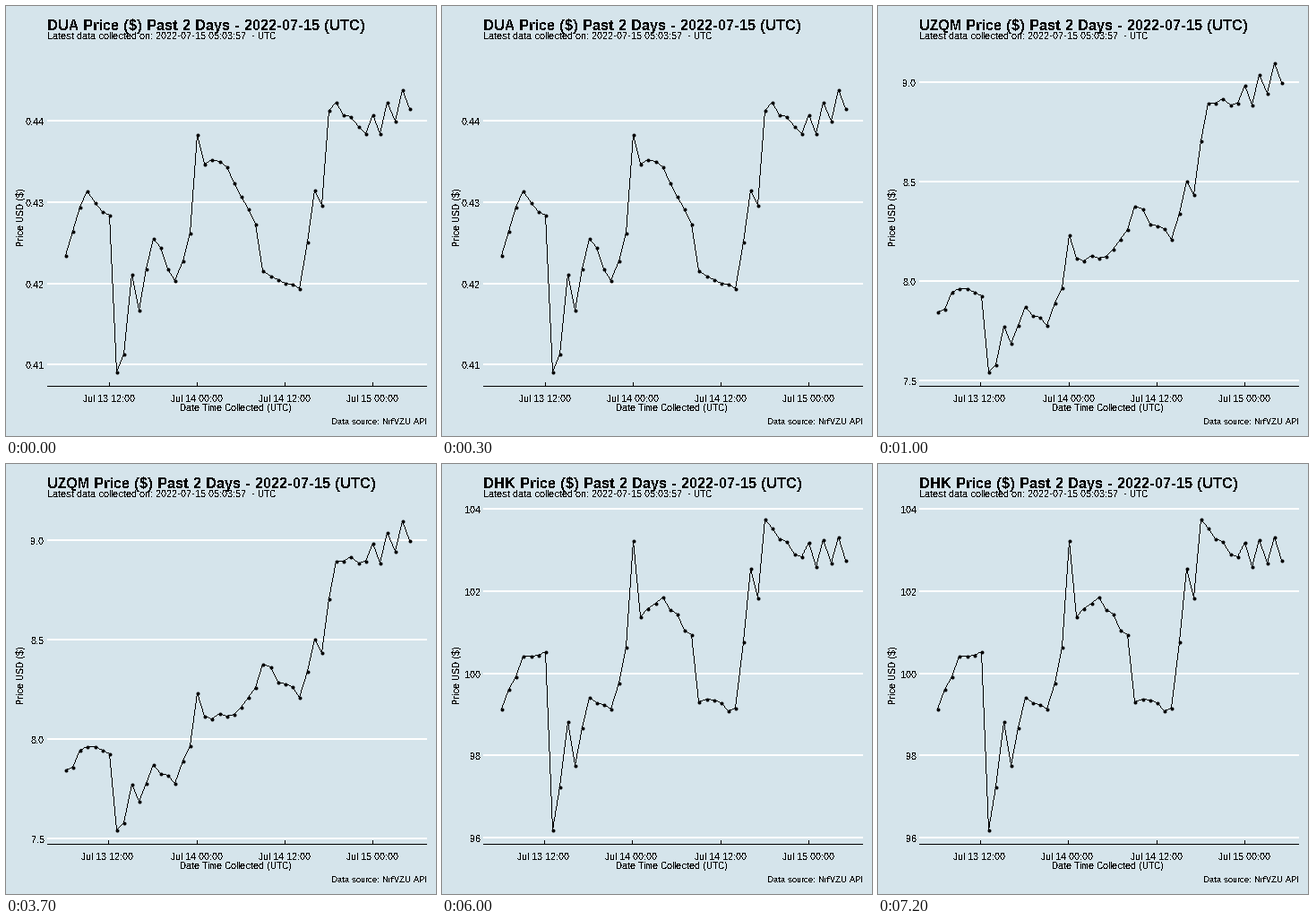
A matplotlib script for the animation above (8000 ms loop, 480x480 px).

```python
import matplotlib.pyplot as plt
import numpy as np
from matplotlib.animation import FuncAnimation

SIZE, DPI = 480, 72
STEP_MS, STEPS = 500, 16
LEFT, RIGHT, BASE = 46, 470, 424.5

plt.rcParams.update({
    "font.family": "Liberation Sans",
    "text.hinting": "native",
    "text.hinting_factor": 1,
    "text.kerning_factor": 6,
    "text.antialiased": False,
})

COINS = ["DUA", "UZQM", "DHK"]

# Turning points of the market: hour, then the height in each chart
TURNS = np.array([
    (0, 278, 341, 273), (3, 206, 315, 214), (6, 233, 323, 209),
    (7, 408, 408, 408), (8, 388, 400, 360), (9, 299, 357, 287),
    (10, 339, 376, 336), (12, 259, 335, 260), (15, 306, 356, 273),
    (17, 253, 314, 204), (18, 143, 255, 85), (19, 176, 281, 170),
    (22, 179, 281, 148), (26, 243, 249, 190), (27, 295, 223, 265),
    (32, 315, 260, 272), (34, 205, 195, 116), (35, 222, 210, 149),
    (36, 116, 150, 61), (37, 107, 108, 71), (41, 142, 108, 103),
    (47, 100, 71, 93),
]).T

# Top grid line, grid spacing, top price, price step, lines, number format
SCALES = [
    (128, 90.75, 0.44, 0.01, 4, ".2f"),
    (85, 111, 9, 0.5, 4, ".1f"),
    (50, 91.75, 104, 2, 5, ".0f"),
]


def heights(k):
    hour = np.arange(48)
    y = np.interp(hour, TURNS[0], TURNS[k + 1])
    noise = np.random.default_rng(k).uniform(-6, 6, 48)
    y += np.where(np.isin(hour, TURNS[0]), 0, noise * (hour < 42))
    # The last hours swing down and up by turns
    y += np.where(hour >= 42, np.where(hour % 2, 14, -14), 0)
    return np.round(y)


PRICES = [heights(k) for k in range(3)]

fig = plt.figure(figsize=(SIZE / DPI, SIZE / DPI), dpi=DPI, facecolor="#d5e4eb")
ax = fig.add_axes([0, 0, 1, 1])


def text(x, y, s, px=11, ha="left", **kw):
    ax.text(x, y, s, fontsize=px, ha=ha, va="baseline", **kw)


def line(x, y, color="black", width=1):
    ax.plot(x, y, color=color, lw=width, solid_capstyle="butt", snap=False)


def stroke(x, y):
    """Hard-edged polyline, one whole pixel at a time."""
    px, py = [], []
    for x0, y0, x1, y1 in zip(x, y, x[1:], y[1:]):
        n = int(max(abs(x1 - x0), abs(y1 - y0))) + 1
        px.append(np.round(np.linspace(x0, x1, n)))
        py.append(np.round(np.linspace(y0, y1, n)))
    px, py = np.concatenate(px), np.concatenate(py)
    ax.hlines(py + 0.5, px, px + 1, colors="black", lw=1, snap=False)


def draw_chart(k):
    top, gap, price, step, count, form = SCALES[k]
    for i in range(count):
        y = round(top + gap * i)
        line([LEFT, RIGHT], [y, y], "white", 2)
        text(43, y + 5, format(price - step * i, form), ha="right")

    x, y = np.round(66 + 49 / 6 * np.arange(48)), PRICES[k]
    stroke(x, y)
    ax.scatter(x + 0.5, y + 0.5, s=16, c="black", lw=0, snap=False, zorder=3)

    line([LEFT, RIGHT], [BASE, BASE])
    for i in range(4):
        tick = int(115.04 - 0.1 * k + 98.1 * i)
        line([tick + 0.5] * 2, [BASE - 4.5, BASE])
        day, hour = divmod(12 * (i + 1), 24)
        text(tick - 0.5, 442, f"Jul {13 + day} {hour:02}:00", ha="center")


def update(n):
    ax.clear()
    ax.set(xlim=(0, SIZE), ylim=(SIZE, 0))
    ax.axis("off")
    # The heading switches one step ahead of the chart
    coin = (n >= 1) + (n >= 11)
    chart = (n >= 2) + (n >= 12)
    draw_chart(chart)
    text(46, 27, f"{COINS[coin]} Price (\\$) Past 2 Days - 2022-07-15 (UTC)",
         17, weight="bold")
    text(46, 37, "Latest data collected on: 2022-07-15 05:03:57  - UTC")
    text(257, 452, "Date Time Collected (UTC)", ha="center")
    text(20, 236, "Price USD (\\$)", ha="center", rotation=90,
         rotation_mode="anchor")
    text(470, 467, "Data source: NifVZU API", 9, ha="right")
    return []


anim = FuncAnimation(fig, update, frames=STEPS, interval=STEP_MS,
                     init_func=lambda: [], repeat=True, repeat_delay=0)
plt.show()
```
